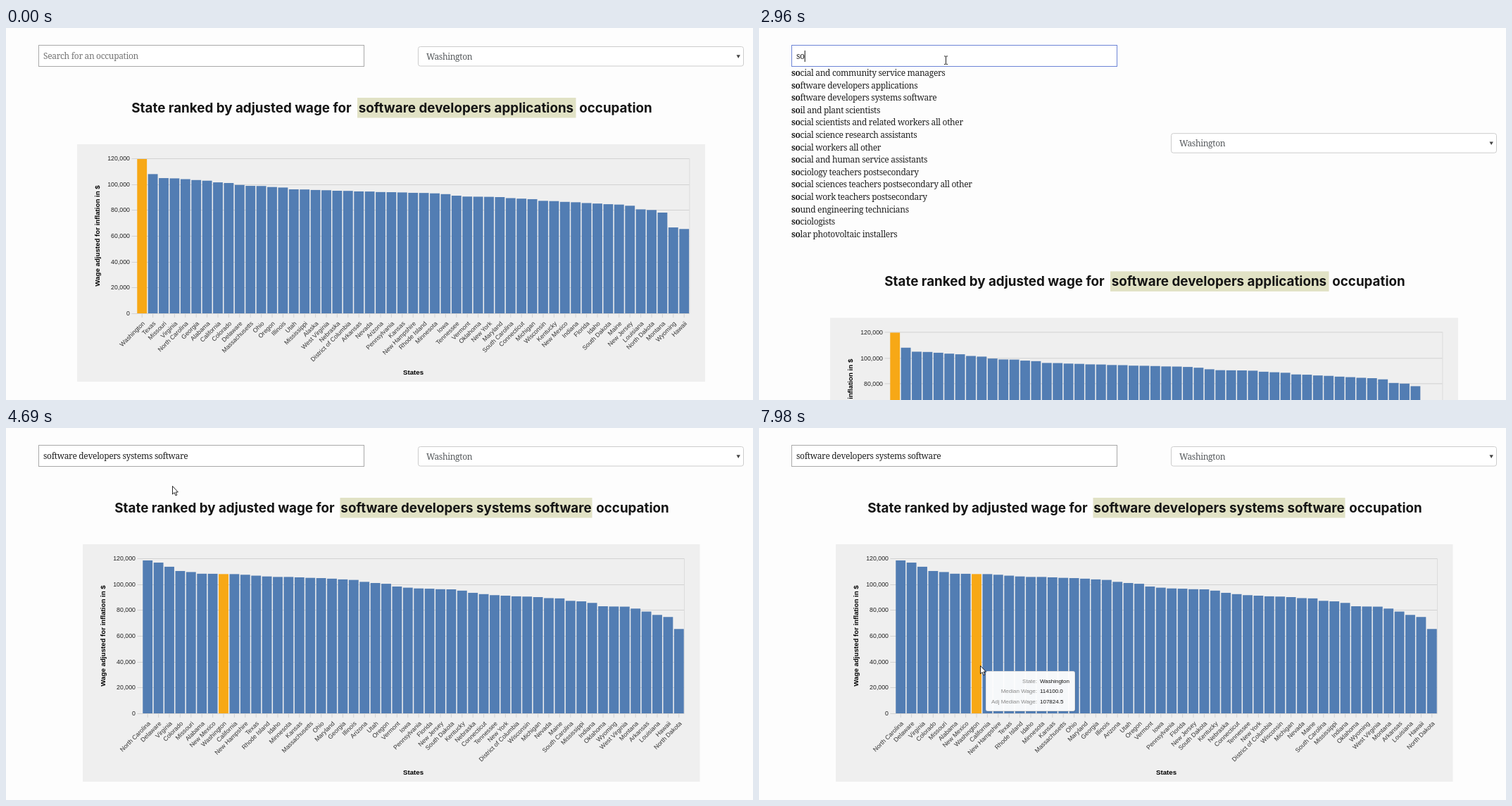
Recreate the animation shown at these times as an HTML page. Size 1061x528 px, loop 8 s.

```html
<!DOCTYPE html>
<html lang="en">
<head>
<meta charset="utf-8">
<title>State wage ranking</title>
<style>
  html, body { margin: 0; width: 100%; height: 100%; overflow: hidden; background: #fdfdfd; }
  svg { display: block; width: 1061px; height: 528px; }
  text { white-space: pre; }
  .slab { font: 12px "Noto Serif", serif; letter-spacing: -.33px; fill: #222; }
  .heading { font: 700 18.8px Inter, sans-serif; fill: #151515; text-anchor: middle; }
  .label { font: 8.8px "Liberation Sans", Arial, sans-serif; fill: #222; text-anchor: end; }
  .axis { font: 700 9.7px "Liberation Sans", Arial, sans-serif; fill: #000; text-anchor: middle; }
  .tip { font: 8px "Liberation Sans", Arial, sans-serif; fill: #111; }
  .key { fill: #888; text-anchor: end; }
</style>
</head>
<body>
<svg id="stage" viewBox="0 0 1061 528"></svg>
<script>
const LOOP = 8000, ROW = 17.6, STEP = 15.4, BASE = 405, PLOT = 220;
const PICK = 4530;
const FULL = 'software developers systems software';

const JOBS = `social and community service managers
software developers applications
software developers systems software
soil and plant scientists
social scientists and related workers all other
social science research assistants
social workers all other
social and human service assistants
sociology teachers postsecondary
social sciences teachers postsecondary all other
social work teachers postsecondary
sound engineering technicians
sociologists
solar photovoltaic installers`.split('\n');

// Adjusted wages in thousands of dollars
const APPS = parse(`Washington 119.45,Texas 107.8,Missouri 104.7,Virginia 104.5,North Carolina 103.9,
Georgia 103.2,Alabama 102.7,California 101.4,Colorado 100.9,Delaware 99.4,Massachusetts 98.7,Ohio 98.6,
Oregon 97.8,Illinois 97.4,Utah 96,Mississippi 95.9,Alaska 95.5,West Virginia 95.3,Nebraska 94.9,
District of Columbia 94.8,Arkansas 94.4,Nevada 94.3,Arizona 93.9,Pennsylvania 93.8,Kansas 93.6,
New Hampshire 93.3,Rhode Island 93.2,Minnesota 92.9,Iowa 92.3,Tennessee 91.1,Vermont 90.4,Oklahoma 90.3,
New York 90.2,Maryland 90,South Carolina 89.2,Connecticut 88.8,Michigan 88.4,Wisconsin 87.1,Kentucky 86.9,
New Mexico 86.3,Indiana 86,Florida 85.4,Idaho 85,South Dakota 84.5,Maine 84.2,New Jersey 83.3,
Louisiana 80.5,North Dakota 80,Montana 78,Wyoming 66.5,Hawaii 65.3`);
const SYSTEMS = parse(`North Carolina 118.4,Delaware 116.7,Virginia 113.5,Colorado 110.2,Missouri 109.4,
Alabama 108.1,New Mexico 108.05,Washington 107.8245,California 107.8,New Hampshire 107.3,Texas 106.6,
Rhode Island 106,Idaho 105.6,Minnesota 105.6,Kansas 105.3,Massachusetts 104.9,Ohio 104.7,Maryland 104.27,
Georgia 103.7,Illinois 103.3,Arizona 101.8,Utah 100.9,Oregon 100.31022,Vermont 98.2,Iowa 97.3,
Pennsylvania 96.7,Florida 96.5,New Jersey 96.1,South Dakota 96,Kentucky 95,Nebraska 93.3,Connecticut 92.3,
Tennessee 91.5,New York 91.1,District of Columbia 90.6,Wisconsin 90.4,Michigan 90,Nevada 89.2,Maine 89,
South Carolina 87.1,Mississippi 86.7,Indiana 85.5,Oklahoma 82.9,Wyoming 82.7,West Virginia 82.6,
Montana 81.1,Arkansas 78.8,Louisiana 76.2,Hawaii 74.6,North Dakota 65.3`);
const MEDIAN = { Oregon: 100110, Washington: 114100 };

// Pointer stops: time, x, y, and the tooltip's offset where one may open
const POINTER = [
  [0, -50, -50], [290, 856, 482], [448, 740, 420], [606, 560, 270], [764, 400, 145],
  [922, 290, 62], [1080, 265, 45],
  [3900, 258, 60], [4060, 246, 74], [4220, 238, 81], [4370, 236, 82],
  [5160, 262, 86], [5318, 350, 98], [5476, 470, 105], [5634, 590, 106],
  [5792, 664, 100], [5950, 640, 76], [6110, 590, 56],
  [6250, 560, 170], [6410, 538, 310, 10], [6570, 541, 394, 10], [6740, 495, 381, 10], [6890, 457, 361, 10],
  [7210, 440, 358, 10], [7370, 412, 353, 10], [7520, 384, 348, 10], [7670, 355, 343, 9],
  [7830, 330, 339, 9], [7980, 314, 337, 8]
];
const TYPING = [[0, ''], [2800, 's'], [2960, 'so'], [3120, 'sof'], [3430, 'soft'], [PICK, FULL]];
const CARET = [[0, 0], [1080, 1], [1550, 0], [2180, 1], [2650, 0], [2800, 1], [3900, 0], [4370, 1], [PICK, 0]];

function parse(text) {
  return text.split(',').map(item => {
    const [, state, wage] = item.trim().match(/^(.*) (\S+)$/);
    return { state, wage: +wage };
  });
}

function el(parent, tag, attrs = {}, text = '') {
  const node = document.createElementNS('http://www.w3.org/2000/svg', tag);
  for (const key in attrs) node.setAttribute(key, attrs[key]);
  node.textContent = text;
  return parent.appendChild(node);
}
const group = parent => el(parent, 'g');
const rect = (parent, x, y, width, height, fill, more) =>
  el(parent, 'rect', { x, y, width, height, fill, ...more });
const label = (parent, cls, x, y, text, more) => el(parent, 'text', { class: cls, x, y, ...more }, text);
const line = (parent, d, stroke = '#d2d2d2') => el(parent, 'path', { d, stroke, fill: 'none' });
const show = (node, on) => node.setAttribute('display', on ? 'inline' : 'none');
const move = (node, x, y) => node.setAttribute('transform', `translate(${x} ${y})`);
const at = (stops, t) => stops.filter(stop => stop[0] <= t).pop();
const wageY = wage => BASE - wage / 120 * PLOT;

function drawHeading(parent, job, centers, boxX, boxWidth) {
  rect(parent, boxX, 99, boxWidth, 28.5, '#e1e2c5');
  ['State ranked by adjusted wage for', job, 'occupation']
    .forEach((text, i) => label(parent, 'heading', centers[i], 120, text));
}

function drawChart(parent, data, left) {
  const right = left + data.length * STEP;
  rect(parent, left - 84.5, 165, right - left + 106.5, 337, '#efefef');
  for (let k = 0; k <= 6; k++) {
    const y = Math.round(BASE - k * PLOT / 6) + .5;
    line(parent, `M${left - 7} ${y}H${right}`);
    label(parent, 'label', left - 9.5, y + 2.8, (k * 20000).toLocaleString('en-US'));
  }
  line(parent, `M${right} 185V${BASE}`, '#dcdcdc');
  data.forEach(({ state, wage }, i) => {
    const x = left + i * STEP, mid = x + STEP / 2, y = wageY(wage);
    rect(parent, x + .77, y, STEP * .9, BASE - y, state === 'Washington' ? '#f7a816' : '#527db3');
    line(parent, `M${mid} ${BASE}v6`);
    label(parent, 'label', 0, 0, state,
      { transform: `translate(${mid + 4.5} 420) rotate(-45)`, style: 'fill:#333' });
  });
  label(parent, 'axis', 0, 0, 'Wage adjusted for inflation in $',
    { transform: `translate(${left - 52.5} 295) rotate(-90)` });
  label(parent, 'axis', 578.5, 491.5, 'States');
}

const stage = document.getElementById('stage');
rect(stage, 0, 0, 1061, 528, '#fdfdfd');

const page = group(stage);
const before = group(page), after = group(page);
drawHeading(before, JOBS[1], [334.5, 653.5, 866], 499, 310.5);
drawChart(before, APPS, 185.5);
drawHeading(after, FULL, [310.5, 653.5, 890], 474.5, 358);
drawChart(after, SYSTEMS, 193.5);

const field = rect(stage, 46.5, 24.5, 462, 30, '#fff');
const typed = label(stage, 'slab', 53, 44, '');
const caret = rect(stage, 53, 32, 1, 16, '#111');
const list = group(stage);

const select = group(stage);
rect(select, 585.5, 26.5, 462, 27.5, '#fff', { rx: 3, stroke: '#ccc' });
label(select, 'slab', 597, 44.5, 'Washington', { style: 'fill:#55595c' });
el(select, 'path', { d: 'M1037.5 38.3h5.4l-2.7 4.6z', fill: '#444' });

const tip = group(stage);
const tipShadow = rect(tip, 1, 1, 120, 56.5, '#000', { rx: 2, opacity: .1 });
const tipBox = rect(tip, .5, .5, 120, 56, '#fff', { rx: 2, stroke: '#e0e0e0', 'fill-opacity': .95 });
const tipValues = ['State:', 'Median Wage:', 'Adj Median Wage:'].map((key, i) => {
  const y = 16.6 + i * 14.6;
  label(tip, 'tip key', 73, y, key);
  return label(tip, 'tip', 77, y, '');
});

const arrow = el(stage, 'path', {
  d: 'M.5 .5V12L3.1 9.6 5 13.9 6.8 13.1 5 9H8.4Z', fill: '#fff', stroke: '#111', 'stroke-width': .9
});
const beam = line(stage, 'M-2.5 -5.5H-.7L0 -5 .7 -5.5H2.5M0 -5V5.5M-2.5 6H-.7L0 5.5 .7 6H2.5', '#222');

function drawField(t) {
  const text = at(TYPING, t)[1];
  const focused = t >= 1080 && t < PICK;
  field.setAttribute('stroke', focused ? '#6c84d6' : '#a9a9a9');
  typed.textContent = text || 'Search for an occupation';
  typed.style.fill = text ? '#222' : '#757575';
  caret.setAttribute('x', 53 + (text ? typed.getComputedTextLength() : 0));
  show(caret, at(CARET, t)[1]);

  const matches = text.length > 1 && focused ? JOBS.filter(job => job.startsWith(text)) : [];
  list.textContent = '';
  matches.forEach((job, i) => {
    const row = label(list, 'slab', 46, 68 + i * ROW, '');
    el(row, 'tspan', { 'font-weight': 700 }, text);
    el(row, 'tspan', {}, job.slice(text.length));
  });
  move(page, 0, matches.length * ROW);
  move(select, 0, matches.length * ROW / 2);
}

function drawPointer(t) {
  const [, x, y, gap] = at(POINTER, t);
  const inField = x > 46 && x < 508 && y > 24 && y < 55;
  show(arrow, !inField);
  show(beam, inField);
  move(arrow, x, y);
  move(beam, x + .5, y + .5);

  const bar = gap && SYSTEMS[Math.floor((x - 193.5) / STEP)];
  const over = bar && y > wageY(bar.wage) && y < BASE;
  show(tip, over);
  if (!over) return;
  const adjusted = +(bar.wage * 1000).toFixed(2);
  const median = MEDIAN[bar.state] || Math.round(adjusted * .102) * 10;
  const values = [bar.state, median.toFixed(1), Number.isInteger(adjusted) ? adjusted.toFixed(1) : adjusted];
  tipValues.forEach((node, i) => node.textContent = values[i]);
  const width = 84 + Math.max(...tipValues.map(node => node.getComputedTextLength()));
  tipBox.setAttribute('width', width);
  tipShadow.setAttribute('width', width + 1);
  move(tip, x + gap, y + gap);
}

function render(t) {
  show(before, t < PICK);
  show(after, t >= PICK);
  drawField(t);
  drawPointer(t);
}

const start = performance.now();
function tick() {
  render((performance.now() - start) % LOOP);
  requestAnimationFrame(tick);
}
tick();
</script>
</body>
</html>
```
